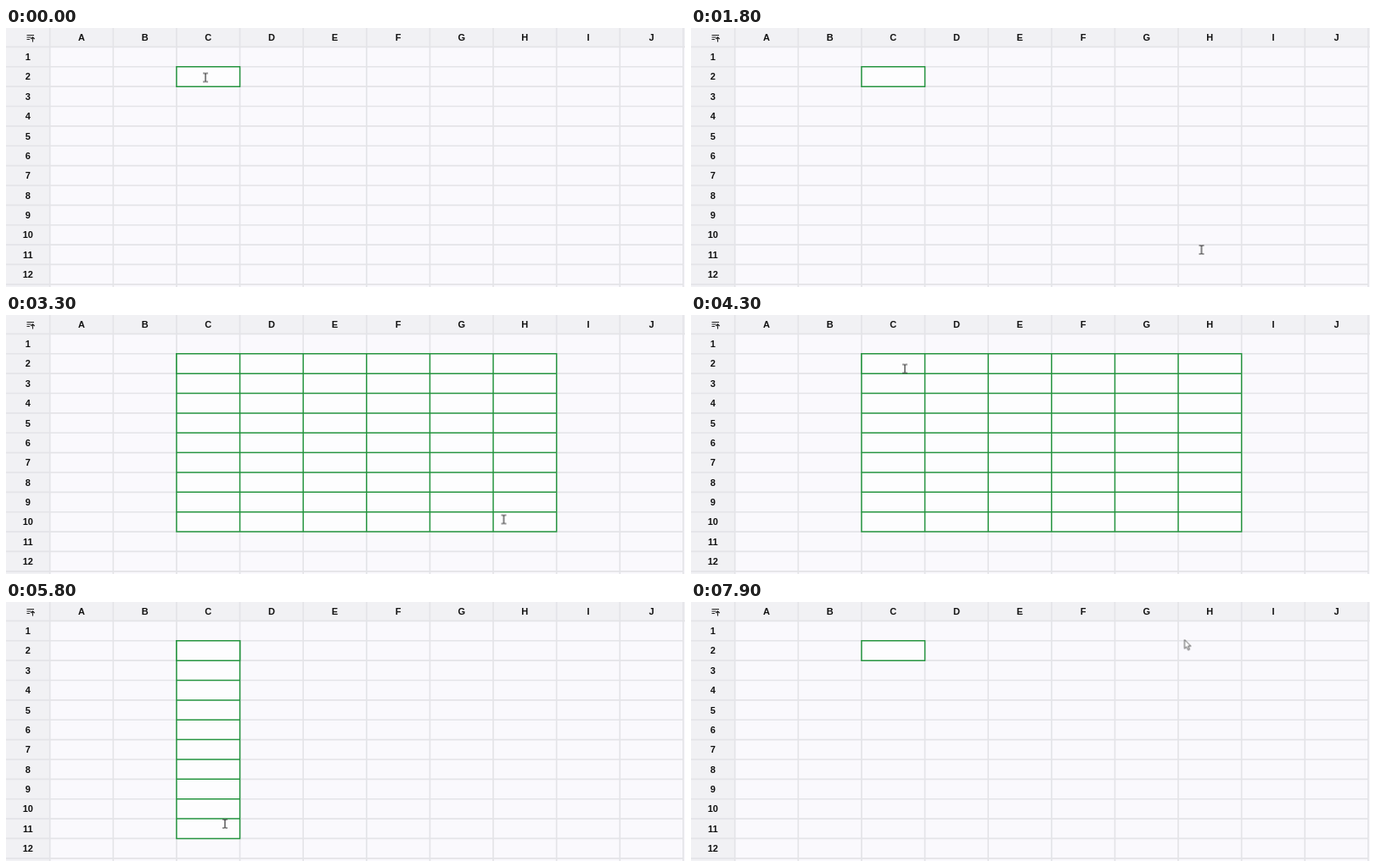
Animation, 800 px wide and 306 px high, one loop 8000 ms. Source, as an HTML page:

```html
<!DOCTYPE html>
<html lang="en">
<head>
<meta charset="utf-8">
<title>Sheet selection</title>
<style>
  html, body { margin: 0; width: 100%; height: 100%; overflow: hidden; background: #faf9fd; }
  svg { display: block; width: 800px; height: 306px; }
  text { font: bold 11px "Liberation Sans", Arial, sans-serif; fill: #111; text-anchor: middle; }
  .head { fill: #f1f1f4; }
  .line { fill: none; stroke: #e4e4e8; stroke-width: 1.7; }
  .icon { fill: none; stroke: #222; stroke-width: 1.1; }
  .sel rect { fill: #fdfdfe; }
  .sel path { fill: none; stroke: #25943f; stroke-width: 1.5; }

  #block, #column, #arrow { opacity: 0; }
  #block { animation: block 8s step-end infinite; }
  #column { animation: column 8s step-end infinite; }
  #arrow { animation: arrow 8s step-end infinite; }
  #beam { animation: beam 8s step-end infinite; }
  #pointer { animation: travel 8s ease-in-out infinite; }

  @keyframes block { 0%, 55% { opacity: 0; } 28.75% { opacity: 1; } }
  @keyframes column { 0%, 88.75% { opacity: 0; } 68.75% { opacity: 1; } }
  @keyframes arrow { 0% { opacity: 0; } 96.25% { opacity: 1; } }
  @keyframes beam { 0% { opacity: 1; } 96.25% { opacity: 0; } }
  @keyframes travel {
    0%, 7.5% { transform: translate(235px, 58.5px); }
    21.25%, 23.75% { transform: translate(601.5px, 262px); }
    27.5% { transform: translate(587px, 243px); }
    41.25%, 42.5% { transform: translate(586.5px, 241.5px); }
    51.25%, 56.25% { transform: translate(252px, 63.5px); animation-timing-function: ease-in; }
    61.25% { transform: translate(257.5px, 97px); animation-timing-function: ease-out; }
    66.25%, 76.25% { transform: translate(258px, 262px); }
    85% { transform: translate(268.5px, 72px); }
    87.5%, 91.25% { transform: translate(267px, 65px); }
    97.5%, 100% { transform: translate(581.5px, 44.5px); }
  }
</style>
</head>
<body>
<svg viewBox="0 0 800 306">
  <rect class="head" width="800" height="22"/>
  <rect class="head" width="52" height="306"/>
  <g id="grid"></g>
  <path class="icon" d="M24.5 8.5H33M24.5 11H29.5M24.5 13.5H28M31.5 16.5V10.8M29.3 13L31.5 10.8L33.7 13"/>
  <g class="sel" id="single"></g>
  <g class="sel" id="block"></g>
  <g class="sel" id="column"></g>
  <g id="pointer">
    <g id="beam" fill="none" stroke="#333" stroke-width="1.2">
      <path d="M-3 -5H-1L0 -4.5L1 -5H3M0 -4.5V4.5M-3 5H-1L0 4.5L1 5H3"/>
    </g>
    <path id="arrow" d="M0 0V10.6L2.4 8.4L4.2 12.3L6 11.5L4.2 7.7H7.5Z" fill="#fff" stroke="#555" stroke-width="1"/>
  </g>
</svg>
<script>
  const colX = i => 51.7 + i * 74.62;
  const rowY = i => 22.4 + i * 23.37;
  const byId = id => document.getElementById(id);

  // Every line of a cell range, as one path.
  function lattice(c0, r0, c1, r1) {
    let d = '';
    for (let c = c0; c <= c1; c++) d += `M${colX(c)} ${rowY(r0)}V${rowY(r1)}`;
    for (let r = r0; r <= r1; r++) d += `M${colX(c0)} ${rowY(r)}H${colX(c1)}`;
    return d;
  }

  function select(id, cols, rows) {
    const x = colX(2), y = rowY(1);
    byId(id).innerHTML =
      `<rect x="${x}" y="${y}" width="${cols * 74.62}" height="${rows * 23.37}"/>` +
      `<path stroke-linecap="square" d="${lattice(2, 1, 2 + cols, 1 + rows)}"/>`;
  }

  let grid = `<path class="line" d="${lattice(0, 0, 10, 13)}`;
  grid += `M0 ${rowY(0)}H800M${colX(0)} 0V306`;
  for (let c = 1; c <= 10; c++) grid += `M${colX(c)} 0V22`;
  for (let r = 1; r <= 12; r++) grid += `M0 ${rowY(r)}H52`;
  grid += '"/>';
  [...'ABCDEFGHIJ'].forEach((name, c) => {
    grid += `<text x="${colX(c + 0.5)}" y="15">${name}</text>`;
  });
  for (let r = 0; r < 12; r++) {
    grid += `<text x="25.8" y="${rowY(r + 0.5) + 4}">${r + 1}</text>`;
  }
  byId('grid').innerHTML = grid;

  select('single', 1, 1);
  select('block', 6, 9);
  select('column', 1, 10);
</script>
</body>
</html>
```
